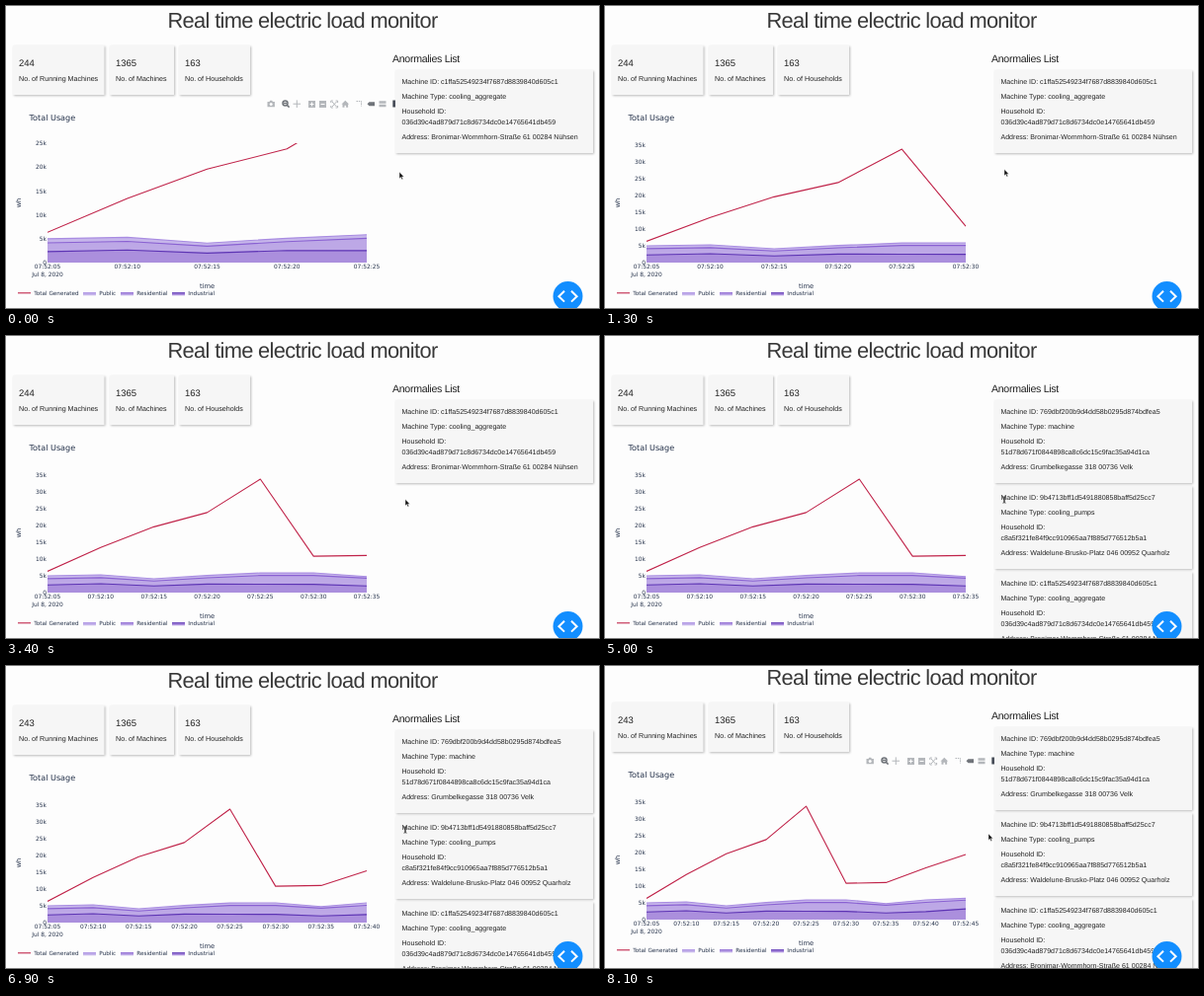
These frames come from a looping animation (600x306 px, 8200 ms). An HTML page:

```html
<!DOCTYPE html>
<html lang="en">
<head>
<meta charset="utf-8">
<title>Real time electric load monitor</title>
<style>
  html, body { margin: 0; width: 100%; height: 100%; overflow: hidden; background: #fdfdfd; }
  svg { display: block; width: 600px; height: 306px; }
  text { text-rendering: geometricPrecision; }
  .ui { font-family: "Liberation Sans", Arial, sans-serif; fill: #222; }
  .chart text { font: 5.9px "DejaVu Sans", Verdana, sans-serif; fill: #222f48; }
  .chart .legend { font-size: 5.7px; }
  .chart .axis { font-size: 6.7px; }
  .chart .heading { font-size: 8.1px; }
  .title { font-size: 21.8px; letter-spacing: -.65px; fill: #383838; }
  .subtitle { font-size: 10.6px; letter-spacing: -.3px; }
  .card { fill: #f6f6f6; filter: drop-shadow(1px 1px 1px #bbb); }
  .small { font-size: 7.05px; }
  .label { font-size: 7.15px; }
  .number { font-size: 9.5px; }
  .middle { text-anchor: middle; }
  .end { text-anchor: end; }
  .line { fill: none; stroke-width: 1.1; stroke-linejoin: round; }
  #modebar { fill: #b4b7bb; stroke: #b4b7bb; stroke-width: 0; }
  #modebar .open { fill: none; stroke-width: 1; }
  #modebar .on { fill: #70747a; stroke: #70747a; }
  #modebar .bold { stroke-width: 1.5; }
</style>
</head>
<body>
<svg viewBox="0 0 600 306">
  <defs><clipPath id="plot"><rect x="42" y="139" width="323.5" height="121.5"/></clipPath></defs>
  <g id="page">
    <text class="ui title" x="163.5" y="22">Real time electric load monitor</text>
    <g id="counters" class="ui"></g>
    <g class="chart">
      <text class="heading" x="23.5" y="115.7">Total Usage</text>
      <g clip-path="url(#plot)" id="series"></g>
      <g id="ticks"></g>
      <text class="middle" x="42" y="273.5">Jul 8, 2020</text>
      <text class="axis middle" x="203.5" y="286">time</text>
      <text class="axis middle" transform="translate(15.2 199.5) rotate(-90)">wh</text>
      <g id="legend"></g>
      <g id="modebar">
        <path d="M264.5 97h2l.7-1.2h2l.7 1.2h2v5.3h-7.4z"/>
        <circle cx="268.2" cy="99.5" r="1.5" fill="#fdfdfd"/>
        <g class="on">
          <circle class="open bold" cx="282.5" cy="98.5" r="2.5"/>
          <path class="open bold" d="M284.2 100.2l2.4 2.4M281 98.5h3"/>
        </g>
        <path class="open" d="M294.3 95.4v7.6M290.5 99.2h7.6"/>
        <path d="M306 96h7v7h-7zM317 96h7v7h-7z"/>
        <path class="open" style="stroke:#fdfdfd" d="M307.5 99.5h4M309.5 97.5v4M318.5 99.5h4"/>
        <path class="open" d="M328.8 98v-2h2M333.6 96h2v2M335.6 101v2h-2M330.8 103h-2v-2M330 97l4.5 5M334.5 97l-4.5 5"/>
        <path d="M339.5 99.5l3.8-3.7 3.8 3.7h-1v3.3h-2v-2h-1.6v2h-2v-3.3z"/>
        <path class="open" d="M354.5 96.5h5v5" stroke-dasharray="1.5 .8"/>
        <path class="on" d="M365.5 99.2l2-2h5.5v4h-5.5z"/>
        <path d="M377.5 96.2h7v2.6h-7zM377.5 99.7h7v2.6h-7z"/>
        <rect x="391.3" y="95.5" width="7" height="7" fill="#444a55"/>
      </g>
    </g>
    <text class="ui subtitle" x="391" y="57">Anormalies List</text>
    <g id="single" class="ui"></g>
    <g id="triple" class="ui"></g>
  </g>
  <rect id="scrollbar" x="596" y="2" width="3" height="290" rx="1.5" fill="#858585"/>
  <circle cx="568.5" cy="294" r="15" fill="#128eff"/>
  <path d="M565 288.8l-5.6 5.4 5.6 5.4M572 288.8l5.6 5.4-5.6 5.4" fill="none" stroke="#fff" stroke-width="2"/>
  <path id="arrow" d="M0 0v6.4l1.5-1.3 1 2.3 1.1-.5-1-2.2h2z" fill="#111" stroke="#fff" stroke-width=".4"/>
  <path id="ibeam" transform="translate(404 166)" d="M-1.5-3.2q1.5 0 1.5 .8v4.8q0 .8-1.5 .8M1.5-3.2q-1.5 0-1.5 .8v4.8q0 .8 1.5 .8" fill="none" stroke="#222" stroke-width=".8"/>
</svg>
<script>
const $ = id => document.getElementById(id);
const LOOP = 8200, STEP = 100;
const UPDATES = [1000, 3200, 5400, 7600];
const RESCALE = 400, NEW_ALERTS = 4600, SCROLL = 7200;
const LEFT = 42, WIDTH = 323, BASE = 260, HEIGHT = 121;

// Thousands of wh, one value every five seconds; areas are cumulative.
const series = [
  { name: "Public", line: "#a98ce2", fill: "#c6b6ea", x: 78, data: [5, 5.3, 4.1, 5.1, 5.85, 5.9, 4.8, 5.9, 6.35] },
  { name: "Residential", line: "#8a62d2", fill: "#bda8e6", x: 116, data: [4.15, 4.45, 3.45, 4.4, 5.1, 5.1, 4.3, 5.15, 5.8] },
  { name: "Industrial", line: "#5d34b4", fill: "#ab8fdd", x: 168, data: [2.3, 2.65, 2, 2.55, 2.5, 2.45, 2, 2.4, 3.2] },
  { name: "Total Generated", line: "#c0244a", x: 12, data: [6.35, 13.45, 19.6, 23.85, 33.8, 10.85, 11.05, 15.45, 19.4] }
];
const alerts = [
  ["769dbf200b9d4dd58b0295d874bdfea5", "machine", "51d78d671f0844898ca8c6dc15c9fac35a94d1ca", "Grumbelkegasse 318 00736 Velk"],
  ["9b4713bff1d5491880858baff5d25cc7", "cooling_pumps", "c8a5f321fe84f9cc910965aa7f885d776512b5a1", "Waldelune-Brusko-Platz 046 00952 Quarholz"],
  ["c1ffa52549234f7687d8839840d605c1", "cooling_aggregate", "036d39c4ad879d71c8d6734dc0e14765641db459", "Bronimar-Wommhorn-Straße 61 00284 Nühsen"]
];

const text = (cls, x, y, body, id = "") => `<text class="${cls}" x="${x}" y="${y}" id="${id}">${body}</text>`;
const card = (x, y, w, h) => `<rect class="card" x="${x}" y="${y}" width="${w}" height="${h}"/>`;
const ramp = (t, from, to) => Math.min(1, Math.max(0, (t - from) / (to - from)));
const ease = p => p < .5 ? 4 * p ** 3 : 1 - (2 - 2 * p) ** 3 / 2;
const mix = (a, b, p) => a + (b - a) * p;
const show = (id, on) => $(id).style.display = on ? "" : "none";

function alertCard([machine, type, household, address], i) {
  const rows = [`Machine ID: ${machine}`, `Machine Type: ${type}`, "Household ID:", household, `Address: ${address}`];
  const baselines = [79.2, 94.2, 108.6, 120.2, 135];
  return card(394, 65 + 87 * i, 200, 84) +
    rows.map((row, r) => text("small", 400.5, baselines[r] + 87 * i, row)).join("");
}

$("counters").innerHTML = [
  [7, 92.5, "244", "No. of Running Machines", "running"],
  [105, 65, "1365", "No. of Machines", "machines"],
  [175, 72, "163", "No. of Households", "households"]
].map(([x, w, count, label, id]) => card(x, 40, w, 50) +
  text("number", x + 6, 61, count, id) + text("label", x + 6, 76, label)).join("");
$("single").innerHTML = alertCard(alerts[2], 0);
$("triple").innerHTML = alerts.map(alertCard).join("");
$("series").innerHTML = series.map((s, i) =>
  (s.fill ? `<path id="area${i}" fill="${s.fill}"/>` : "") +
  `<path id="line${i}" class="line" stroke="${s.line}"/>`).join("");
$("legend").innerHTML = series.map(s =>
  (s.fill ? `<rect x="${s.x}" y="290.5" width="13" height="2.8" fill="${s.fill}"/>` : "") +
  `<path class="line" stroke="${s.line}" d="M${s.x} 290.8h13"/>` +
  text("legend", s.x + 16.3, 293.2, s.name)).join("");

function drawChart(t) {
  const end = UPDATES.reduce((sum, at) => sum + 5 * ease(ramp(t, at, at + 200)), 25);
  const count = 5 + UPDATES.filter(at => t >= at).length;
  const top = t < RESCALE ? 25.05 : 35.58;
  const px = i => LEFT + WIDTH * 5 * i / (end - 5);
  const py = v => BASE - HEIGHT * v / top;
  series.forEach((s, i) => {
    const path = "M" + s.data.slice(0, count).map((v, k) => `${px(k)} ${py(v)}`).join("L");
    $("line" + i).setAttribute("d", path);
    if (s.fill) $("area" + i).setAttribute("d", `${path}V${BASE}H${LEFT}Z`);
  });
  let ticks = "";
  for (let k = 0; 5 * k + 5 <= end + .01; k++)
    ticks += text("middle", px(k), 266.2, "07:52:" + String(5 * k + 5).padStart(2, "0"));
  for (let v = 0; v <= top; v += 5)
    ticks += text("end", 41, py(v) + 2.1, v ? v + "k" : "0");
  $("ticks").innerHTML = ticks;
}

function drawPointer(t) {
  const enter = ease(ramp(t, 0, 300)), leave = ease(ramp(t, 7600, 7900));
  const x = mix(mix(398, 404, enter), 388, leave);
  const y = mix(mix(168.3, 165.5, enter), 170, leave);
  const overText = t >= NEW_ALERTS && t <= 7600;
  show("arrow", !overText);
  show("ibeam", overText);
  $("arrow").setAttribute("transform", `translate(${x} ${y})`);
}

function draw(t) {
  drawChart(t);
  drawPointer(t);
  $("running").textContent = t < UPDATES[2] ? "244" : "243";
  show("single", t < NEW_ALERTS);
  show("triple", t >= NEW_ALERTS);
  $("modebar").style.opacity = Math.max(1 - ramp(t, 100, 300), ramp(t, 7700, 7900));
  $("page").setAttribute("transform", `translate(0 ${-3 * ease(ramp(t, SCROLL - 100, SCROLL + 100))})`);
  $("scrollbar").style.opacity = t < SCROLL - 100 ? 0 : 1 - ramp(t, 7600, 7900);
}

const start = performance.now();
function frame() {
  const t = (performance.now() - start) % LOOP;
  draw(Math.floor(t / STEP) * STEP);
  requestAnimationFrame(frame);
}
frame();
</script>
</body>
</html>
```
